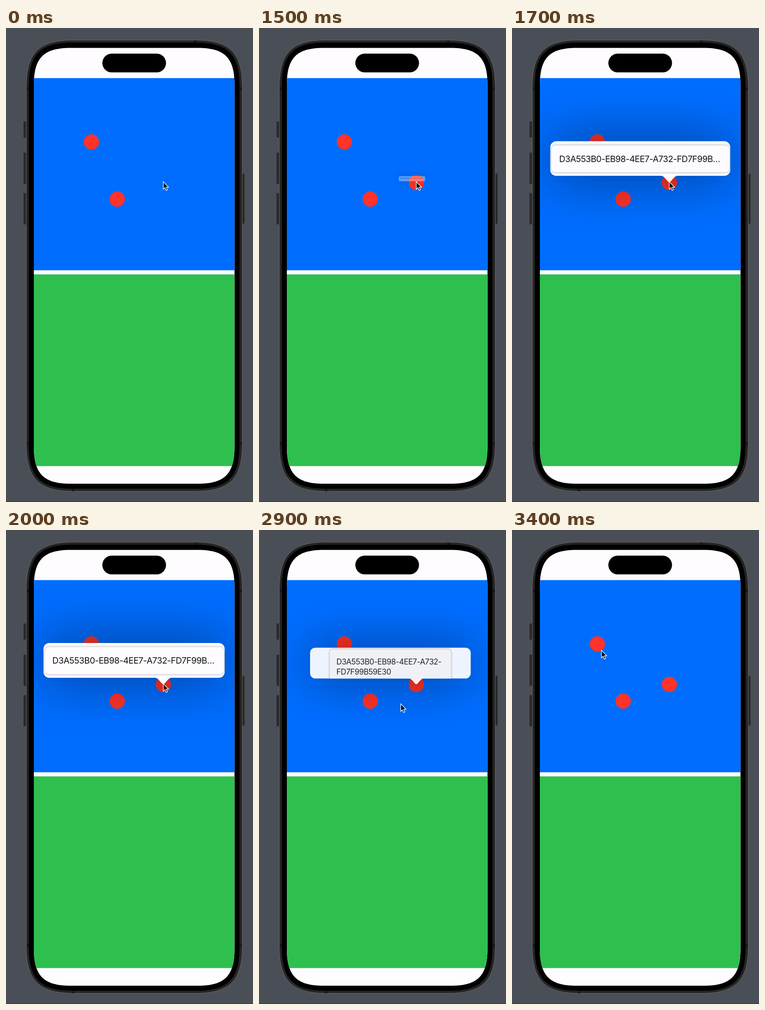
Write an HTML page that moves like this. It is 541 px wide and 1036 px high and loops after 3500 ms.

```html
<!DOCTYPE html>
<html lang="en">
<head>
<meta charset="utf-8">
<title>Popover on a dot</title>
<style>
html, body { margin: 0; width: 100%; height: 100%; overflow: hidden; background: #4a4f57; }
svg { display: block; width: 541px; height: 1036px; }
text { font: 19px Inter, "Liberation Sans", sans-serif; font-optical-sizing: none; letter-spacing: -.5px; }
.card { filter: drop-shadow(0 0 2.5px rgba(0, 0, 0, .38)); }
</style>
</head>
<body>
<svg viewBox="0 0 541 1036">
  <defs>
    <clipPath id="screenClip"><path id="screenShape"/></clipPath>
    <clipPath id="bodyClip"><rect x="82" y="247" width="397" height="76" rx="13"/></clipPath>
    <filter id="blur" filterUnits="userSpaceOnUse" x="-150" y="0" width="860" height="570">
      <feGaussianBlur stdDeviation="60"/>
    </filter>
  </defs>

  <path d="M0 1035.5H541" stroke="#2b2e33"/>
  <g fill="#29292a" stroke="#38393b" stroke-width=".8">
    <rect x="38.5" y="204.5" width="6" height="35" rx="1"/>
    <rect x="38.5" y="272.5" width="6" height="68" rx="1"/>
    <rect x="38.5" y="361" width="6" height="68" rx="1"/>
    <rect x="517" y="318.5" width="5.5" height="109" rx="1"/>
  </g>
  <path id="frame" fill="#242425" stroke="#686666"/>
  <path d="M412 29.5h6M144 1010h6M47.5 130v6M514.5 130v6M47.5 905v6M514.5 905v6" stroke="#171718" stroke-width="5"/>
  <path id="bezel"/>

  <g clip-path="url(#screenClip)">
    <path fill="#fefcff" d="M61 43H501V997H61z"/>
    <path fill="#006dff" d="M61 109.5H501V529.5H61z"/>
    <path fill="#2fbf4f" d="M61 538.5H501V957.5H61z"/>
    <rect x="211" y="56" width="139.5" height="41" rx="20.5"/>
    <g fill="#ff3329">
      <circle cx="187" cy="249" r="16.7"/>
      <circle cx="243.6" cy="374" r="16.7"/>
      <circle id="newDot" cx="344.7" cy="337.5" r="16.7"/>
    </g>
    <g id="popover">
      <rect x="82" y="247" width="397" height="76" rx="13" opacity=".5" filter="url(#blur)"/>
      <g fill="#fefdff">
        <rect x="82" y="247" width="397" height="76" rx="13"/>
        <path d="M325 322.5C330 323 332 325 335 328L341.5 335.5Q344.5 338.5 347.5 335.5L354 328C357 325 359 323 364 322.5z"/>
      </g>
      <g clip-path="url(#bodyClip)">
        <g id="oneLine">
          <rect class="card" x="84.5" y="256" width="392.5" height="59" rx="9" fill="#fefcff"/>
          <text x="101.5" y="292.5" fill="#111">D3A553B0-EB98-4EE7-A732-FD7F99B…</text>
        </g>
        <g id="twoLines">
          <rect class="card" x="130.5" y="251" width="300" height="85" rx="9" fill="#fffaf5"/>
          <text x="147" y="288" fill="#202020">D3A553B0-EB98-4EE7-A732-</text>
          <text x="147" y="313" fill="#202020">FD7F99B59E30</text>
        </g>
      </g>
    </g>
  </g>
  <path id="cursor" d="M0 0V16.2L3.7 12.8L6.2 18.8L9 17.6L6.5 11.8H11.4z" stroke="#fff" stroke-width="1.3"/>
</svg>
<script>
const LOOP = 3500, STEP = 100, OPEN = 1479, CLOSE = 2877;
const $ = id => document.getElementById(id);
const show = (id, on) => $(id).setAttribute("visibility", on ? "inherit" : "hidden");

// Rounded rectangle with continuous corners
function smoothRect(l, t, r, b, radius) {
  const a = radius * 1.3, c = radius * .348;
  return `M${l} ${t + a}C${l} ${t + c} ${l + c} ${t} ${l + a} ${t}H${r - a}` +
    `C${r - c} ${t} ${r} ${t + c} ${r} ${t + a}V${b - a}` +
    `C${r} ${b - c} ${r - c} ${b} ${r - a} ${b}H${l + a}` +
    `C${l + c} ${b} ${l} ${b - c} ${l} ${b - a}z`;
}
$("frame").setAttribute("d", smoothRect(44.5, 26.5, 517.5, 1012.5, 79));
$("bezel").setAttribute("d", smoothRect(50, 32, 511.5, 1007, 73));
$("screenShape").setAttribute("d", smoothRect(61, 43.5, 500.5, 996, 62));

// Critically damped spring from 0 to 1
function spring(ms, rate) {
  const x = Math.max(0, ms) * rate / 1000;
  return 1 - (1 + x) * Math.exp(-x);
}

// time, x, y of the pointer tip
const path = [
  [0, 344.5, 336], [2200, 344.5, 336], [2600, 310.5, 380], [3100, 310.5, 380],
  [3200, 296, 380], [3300, 240, 322], [3400, 196, 263], [3500, 196, 263]
];
function pointer(t) {
  const i = path.findIndex(p => p[0] > t);
  const [t0, x0, y0] = path[i - 1], [t1, x1, y1] = path[i];
  const u = (t - t0) / (t1 - t0), k = u * u * (3 - 2 * u);
  return [x0 + (x1 - x0) * k, y0 + (y1 - y0) * k];
}

function draw(now) {
  const t = Math.floor(now % LOOP / STEP) * STEP;
  const closing = t > CLOSE;
  const s = closing ? 1 - spring(t - CLOSE, 25) : spring(t - OPEN, 32);
  show("newDot", t >= 1100);
  show("popover", s > .01 && t < 3200);
  show("oneLine", !closing);
  show("twoLines", closing);
  $("popover").setAttribute("transform", `translate(344.5 337) scale(${s}) translate(-344.5 -337)`);
  $("popover").setAttribute("opacity", s ** .55);
  $("cursor").setAttribute("transform", `translate(${pointer(t)})`);
}

const start = performance.now();
function tick() {
  draw(performance.now() - start);
  requestAnimationFrame(tick);
}
tick();
</script>
</body>
</html>
```
